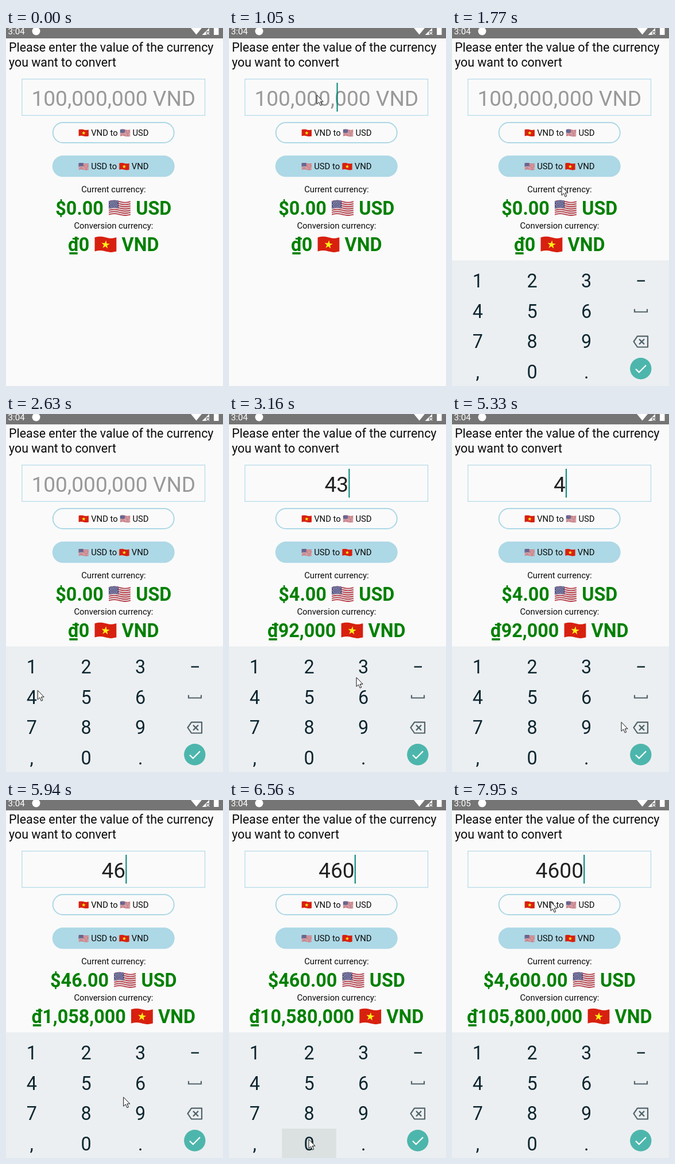
An HTML page with a canvas for the animation above (8000 ms loop, 378x621 px).

```html
<!DOCTYPE html>
<html lang="en">
<head>
<meta charset="utf-8">
<title>Currency converter</title>
<style>
html, body { margin: 0; width: 100%; height: 100%; overflow: hidden; background: #fafafa; }
canvas { display: block; width: 378px; height: 621px; }
</style>
</head>
<body>
<canvas id="stage"></canvas>
<script>
const W = 378, H = 621, LOOP = 8000, STEP = 77.2, MID = 187.3;
const FOCUS = 990, LAG = 80, PRESS = 90, RATE = 23000;
const BLUE = '#add8e6', BLACK = '#0a0a0a', INK = '#0c2630', ICON = '#50636b';
const KEYS = ['123-', '456_', '789<', ',0.>'];

const canvas = document.getElementById('stage');
const g = canvas.getContext('2d');
const dpr = window.devicePixelRatio || 1;
canvas.width = W * dpr;
canvas.height = H * dpr;

const taps = [[2780, '4'], [3100, '3'], [5080, '<'], [5780, '6'], [6390, '0'], [6600, '0']];

// centre of a key on the pad
function keyAt(key) {
  const r = KEYS.findIndex(row => row.includes(key));
  return [44.8 + KEYS[r].indexOf(key) * 94.7, 439 + r * 52.7];
}

// the mouse visits each tapped key, with a few points between
const path = [
  [120, 360, 428], [820, 150, 115], [1370, 160, 118], [1775, 190.5, 274], [2080, 226, 420],
  [3165, 221.5, 456.5], [3397, 195, 575], [3870, 150, 577], [4477, 363.5, 476],
  [5327, 294.5, 534], [5404, 237, 486], [6940, 139, 588], [7250, 268, 296],
  [7570, 262, 290], [7951, 171.5, 176],
  ...taps.map(([t, key]) => [t - 60, keyAt(key)[0] - 1, keyAt(key)[1] - 9])
].sort((a, b) => a[0] - b[0]);

function mouseAt(t) {
  const i = path.findIndex(p => p[0] > t);
  if (i === 0) return null;
  if (i < 0) return path[path.length - 1].slice(1);
  const a = path[i - 1], b = path[i];
  const u = (t - a[0]) / (b[0] - a[0]), f = u * u * (3 - 2 * u);
  return [a[1] + (b[1] - a[1]) * f, a[2] + (b[2] - a[2]) * f];
}

const tapsBy = t => taps.filter(k => k[0] <= t);

function typedAt(t) {
  return tapsBy(t).reduce((s, [, key]) => key === '<' ? s.slice(0, -1) : s + key, '');
}

function rect(x, y, w, h, color) {
  g.fillStyle = color;
  g.fillRect(x, y, w, h);
}

function trace(points, closed) {
  g.beginPath();
  points.forEach(p => g.lineTo(p[0], p[1]));
  if (closed) g.closePath();
}

function poly(points, color) {
  trace(points, true);
  g.fillStyle = color;
  g.fill();
}

function stroke(points, color, width, closed) {
  trace(points, closed);
  g.strokeStyle = color;
  g.lineWidth = width;
  g.stroke();
}

function cross(x, y, r, color, width) {
  stroke([[x - r, y - r], [x + r, y + r]], color, width);
  stroke([[x + r, y - r], [x - r, y + r]], color, width);
}

function disc(x, y, r, color) {
  g.beginPath();
  g.arc(x, y, r, 0, Math.PI * 2);
  g.fillStyle = color;
  g.fill();
}

function font(size, weight = 400) {
  g.font = `${weight} ${size}px Roboto, sans-serif`;
}

function text(s, x, y, size, color, align = 'left') {
  font(size);
  g.textAlign = align;
  g.fillStyle = color;
  g.fillText(s, x, y);
}

function flag(kind, x, cy, em) {
  const w = em * 1.17, h = em * 0.75, amp = em * 0.045;
  const at = (u, v) => [x + u * w, cy + (v - 0.5) * h - amp * Math.sin(u * Math.PI * 2)];
  const band = (u1, v0, v1, color) => {
    const pts = [], n = 14;
    for (let i = 0; i <= n; i++) pts.push(at(u1 * i / n, v0));
    for (let i = n; i >= 0; i--) pts.push(at(u1 * i / n, v1));
    poly(pts, color);
  };
  if (kind === 'VN') {
    band(1, 0, 1, '#d8200f');
    const [sx, sy] = at(0.5, 0.52), star = [];
    for (let i = 0; i < 10; i++) {
      const r = em * (i % 2 ? 0.092 : 0.235), a = i * Math.PI / 5 - Math.PI / 2 + 0.12;
      star.push([sx + r * Math.cos(a), sy + r * Math.sin(a)]);
    }
    poly(star, '#ffef1a');
    return;
  }
  band(1, 0, 1, '#e6e4e4');
  for (let i = 0; i < 13; i += 2) band(1, i / 13, (i + 1) / 13, '#b9404c');
  band(0.45, 0, 7 / 13, '#47477a');
  for (let r = 0; r < 5; r++) {
    for (let c = 0; c < 6 - r % 2; c++) {
      const [sx, sy] = at(0.045 + c * 0.072 + (r % 2) * 0.036, 0.07 + r * 0.1);
      disc(sx, sy, em * 0.025, '#d9d8e4');
    }
  }
}

// centred run of words and flags
function run(parts, y, size, weight, color) {
  font(size, weight);
  g.textAlign = 'left';
  const isFlag = p => p === 'VN' || p === 'US';
  const width = p => isFlag(p) ? size * 1.245 : g.measureText(p).width;
  let x = MID - parts.reduce((sum, p) => sum + width(p), 0) / 2;
  for (const p of parts) {
    if (isFlag(p)) flag(p, x + size * 0.037, y - size * 0.345, size);
    else {
      g.fillStyle = color;
      g.fillText(p, x, y);
    }
    x += width(p);
  }
}

function statusBar(t) {
  rect(0, 0, W, 18, '#757575');
  text(t > 7600 ? '3:05' : '3:04', 3.5, 11, 15.2, '#fff');
  disc(52.5, 5.5, 7, '#fff');
  poly([[322, 0], [341, 0], [331.5, 11.5]], '#fff');
  poly([[341.5, 12], [354, 0], [354, 12]], '#fff');
  rect(348.5, 5.5, 7, 7, '#757575');
  cross(351.8, 9, 2.4, '#fff', 1.3);
  rect(362, 0, 8.5, 12, '#fff');
}

function pill(y, filled) {
  const inset = filled ? 0 : 1;
  g.beginPath();
  g.roundRect(80.7 + inset, y + inset, 213 - 2 * inset, 37 - 2 * inset, 18.5 - inset);
  g.fillStyle = g.strokeStyle = BLUE;
  g.lineWidth = 2;
  if (filled) g.fill();
  else g.stroke();
}

function input(t) {
  const typed = typedAt(t);
  g.strokeStyle = BLUE;
  g.lineWidth = 1.1;
  g.strokeRect(27.8, 88.6, 318.7, 63);
  text(typed || '100,000,000 VND', MID, 135, 37.1, typed ? '#212121' : '#999', 'center');
  if (t < FOCUS) return;
  const last = tapsBy(t).pop();
  const blink = Math.floor((t - (last ? last[0] : FOCUS)) / 500);
  if (blink % 2 === 0) {
    rect(MID + (typed ? g.measureText(typed).width / 2 : 0) + 0.2, 95, 2, 50, '#008577');
  }
}

function form(t) {
  text('Please enter the value of the currency', 5, 41, 21.4, BLACK);
  text('you want to convert', 5, 67, 21.4, BLACK);
  input(t);

  pill(163, false);
  run(['VN', ' VND to ', 'US', ' USD'], 187, 14.8, 400, BLACK);
  pill(221.3, true);
  run(['US', ' USD to ', 'VN', ' VND'], 245.3, 14.8, 400, BLACK);

  const amount = Number(typedAt(t - LAG));
  const usd = amount.toLocaleString('en-US', { minimumFractionDigits: 2 });
  const vnd = (amount * RATE).toLocaleString('en-US');
  text('Current currency:', MID, 285, 14.8, BLACK, 'center');
  run(['$' + usd + ' ', 'US', ' USD'], 323.5, 32.3, 700, '#008000');
  text('Conversion currency:', MID, 348, 14.8, BLACK, 'center');
  run(['\u20ab' + vnd + ' ', 'VN', ' VND'], 386.5, 32.3, 700, '#008000');
}

function keyboard(t) {
  if (t < 1370) return;
  const left = Math.max(0, (1600 - t) / 310);
  g.save();
  g.translate(0, 219 * left * left);
  rect(0, 403, W, 219, '#eceff1');

  const down = taps.find(k => t >= k[0] - PRESS && t < k[0]);
  if (down) {
    const [x, y] = keyAt(down[1]);
    rect(x - 47.2, y - 27, 94.5, 52.6, '#dbe0e1');
  }
  for (const row of KEYS) {
    for (const key of row.slice(0, 3)) {
      const [x, y] = keyAt(key);
      text(key, x, y + 11, 32.3, INK, 'center');
    }
  }

  rect(322.5, 437.4, 13.5, 2.4, INK);
  stroke([[318, 487.5], [318, 492.5], [340, 492.5], [340, 487.5]], ICON, 2.2);
  g.lineJoin = 'round';
  stroke([[316.5, 544], [323, 534.7], [341, 534.7], [341, 553.5], [323, 553.5]], ICON, 2.2, true);
  g.lineJoin = 'miter';
  cross(330.5, 544.1, 4.5, ICON, 2.2);
  disc(328.8, 590.8, 18.7, '#4db6ac');
  stroke([[320, 591.5], [325.8, 597.2], [338, 585]], '#fff', 2.3);
  g.restore();
}

function pointer(t) {
  const p = mouseAt(t);
  if (!p) return;
  const arrow = [[0.5, 0.5], [0.5, 16.3], [4.1, 12.9], [6.7, 18.8], [9.2, 17.7], [6.7, 12], [11.6, 12]];
  g.save();
  g.translate(p[0], p[1]);
  poly(arrow, '#fff');
  stroke(arrow, '#111', 1, true);
  g.restore();
}

function frame(now) {
  const t = Math.floor((now % LOOP + 15) / STEP) * STEP;
  g.setTransform(dpr, 0, 0, dpr, 0, 0);
  rect(0, 0, W, H, '#fafafa');
  form(t);
  keyboard(t);
  statusBar(t);
  pointer(t);
  requestAnimationFrame(frame);
}
requestAnimationFrame(frame);
</script>
</body>
</html>
```
